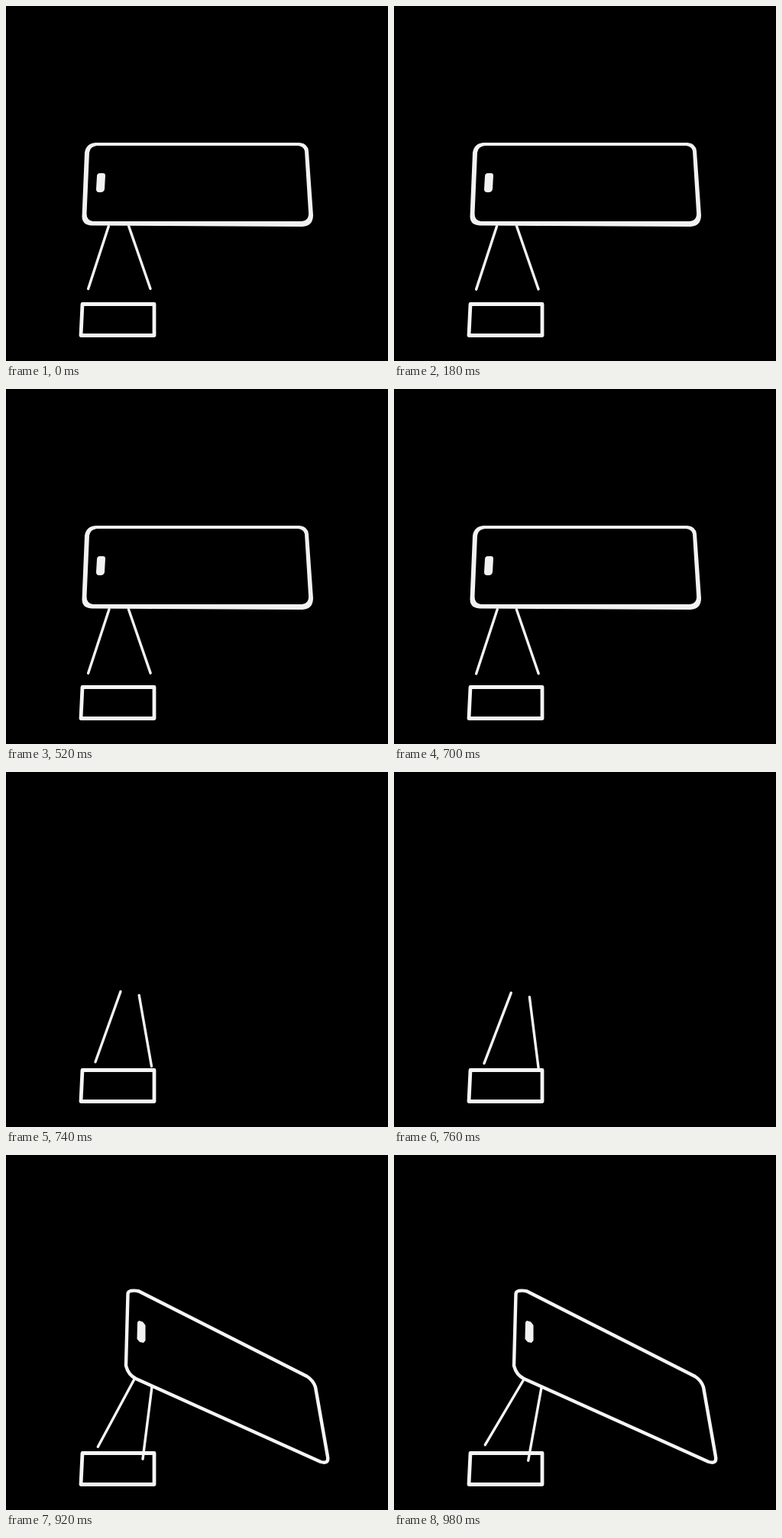
Recreate the animation shown at these times as an HTML page. Size 500 by 465 pixels, loop 2000 ms.

```html
<!DOCTYPE html>
<html lang="en">
<head>
<meta charset="utf-8">
<title>Tilting phone</title>
<style>
  html, body { margin: 0; width: 100%; height: 100%; overflow: hidden; background: #000; }
  svg { display: block; width: 100%; height: 100%; }
  .stroke { fill: none; stroke: #f5f5f5; stroke-linecap: round; stroke-linejoin: round; }
  .solid { fill: #f2f2f2; fill-rule: evenodd; }
</style>
</head>
<body>
<svg viewBox="0 0 500 465">
  <g id="legs" class="stroke" stroke-width="3.4">
    <line/><line/>
  </g>
  <path class="stroke" stroke-width="4.8" d="M100 390.5H194V431.5H98Z"/>
  <g class="pose">
    <path class="solid" d="M117 179H384Q395 180 396 190L402 274Q402 288 388 289L112 287.5Q100 287 99.5 276L103 192Q105 180 117 179Z
      M119 183Q110 184 109 192L105.5 272Q105.5 281 114 282H387Q397 281 396 270L391 190Q390 184 382 183Z"/>
    <path class="solid" d="M123 219H127Q130 219 130 222L129 240Q128 244 124 244H122Q118 244 118 240L119 223Q119 219 123 219Z"/>
  </g>
  <g class="pose">
    <path class="stroke" stroke-width="5.6" d="M133.5 185L130.5 267Q130.500 280 146 286L402 375Q415 377 413 367L396 276Q393 262 378 256L150 179Q135 175 133.500 185Z"/>
    <path class="solid" d="M147 215H150L154 219V238Q153 242 149 242L143 239V219Q144 215 147 215Z"/>
  </g>
  <g class="pose">
    <path class="stroke" stroke-width="4.4" d="M159.500 182L157 276Q160 288 170 293L412 402Q423 405 421 395L405 304Q402 295 394 290L174 178.500Q168 177 163 178Q159.500 179 159.500 182Z"/>
    <path class="solid" d="M174 217L179 218.500L182.500 223V243L180 246L175 245L171.500 241L172 219Z"/>
  </g>
</svg>
<script>
const LOOP = 2000, STEP = 20;

// time, then x1 y1 x2 y2 of the left and the right leg
const legKeys = [
  [0,   134.3, 288.5, 107.6, 370.5, 160.7, 288.5, 189, 370.3],
  [710, 135.3, 288.5, 107.6, 373,   160.3, 288.5, 189.2, 372.8],
  [740, 150,   287.5, 117,   379.8, 174.2, 292.5, 190.5, 385.5],
  [840, 163,   295,   121,   387.5, 187,   301.5, 185, 396],
  [920, 168.3, 293,   120.3, 382.3, 191,   303.5, 179, 398.3],
  [980, 170.2, 293.5, 119.3, 379.7, 193,   304.5, 175.7, 400.3]
];
const poseTimes = [[0, 720], [780, 880], [880, LOOP]];

const legs = document.querySelectorAll('#legs line');
const poses = document.querySelectorAll('.pose');

function legsAt(t) {
  const next = legKeys.findIndex(k => k[0] > t);
  if (next < 0) return legKeys[legKeys.length - 1].slice(1);
  const a = legKeys[next - 1], b = legKeys[next];
  let p = (t - a[0]) / (b[0] - a[0]);
  if (a[0] >= 740) p *= 1.3 - 0.3 * p;
  return a.slice(1).map((v, i) => v + (b[i + 1] - v) * p);
}

function draw(t) {
  const ends = legsAt(t);
  legs.forEach((leg, i) =>
    ['x1', 'y1', 'x2', 'y2'].forEach((name, j) => leg.setAttribute(name, ends[i * 4 + j])));
  poses.forEach((pose, i) => {
    const [from, to] = poseTimes[i];
    pose.setAttribute('visibility', t >= from && t < to ? 'visible' : 'hidden');
  });
}

const start = performance.now();
function tick() {
  const t = Math.max(0, performance.now() - start) % LOOP;
  draw(Math.floor(t / STEP) * STEP);
  requestAnimationFrame(tick);
}
tick();
</script>
</body>
</html>
```
